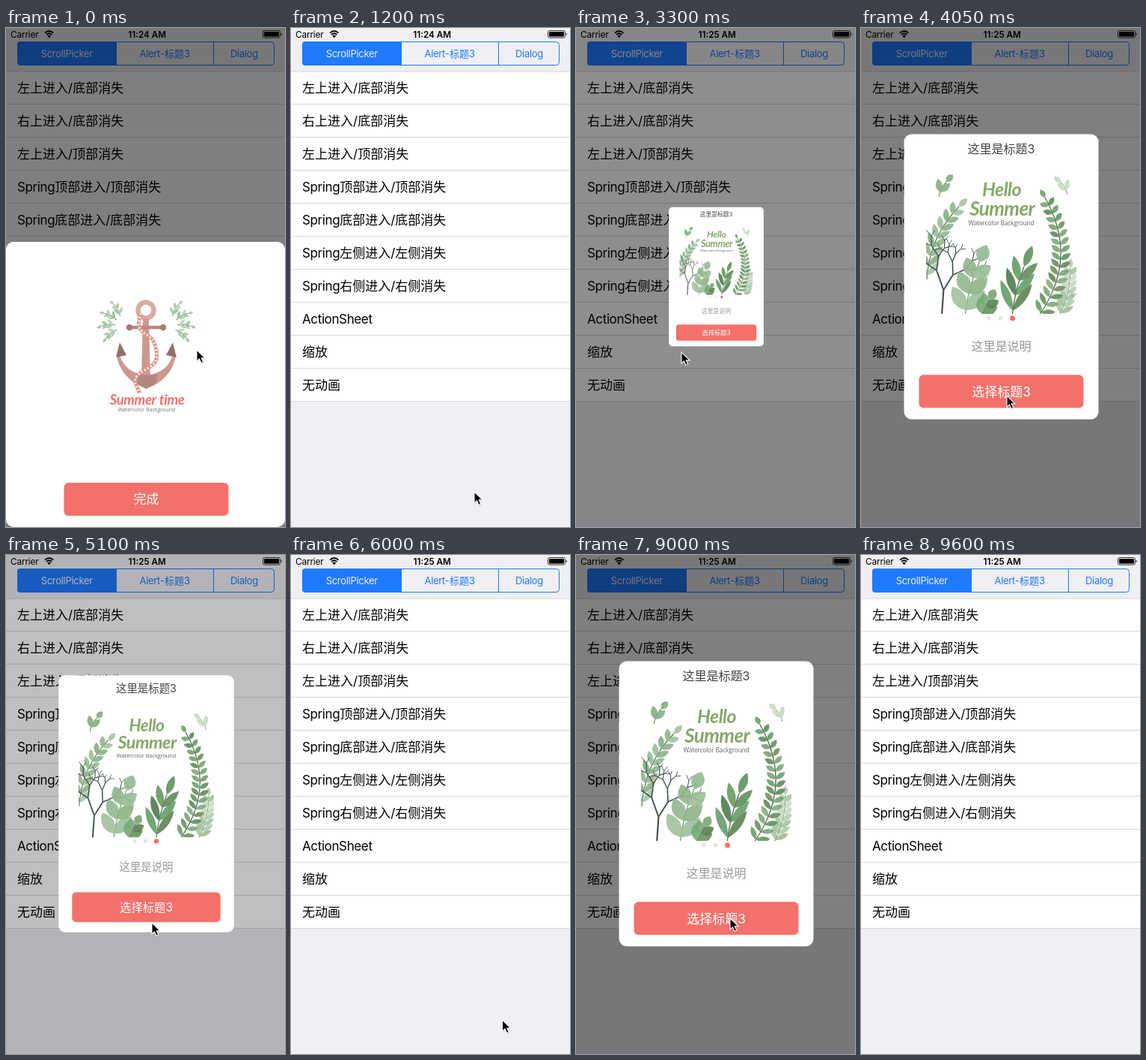
An HTML page for the animation above (9910 ms loop, 373x665 px).

```html
<!DOCTYPE html>
<html lang="zh">
<head>
<meta charset="utf-8">
<style>
html, body { margin: 0; height: 100%; overflow: hidden; background: #efeff4; }
svg { display: block; width: 100vw; height: 100vh; }
text { font-family: Inter, "Noto Sans CJK SC", "Noto Sans CJK", sans-serif; white-space: pre; }
.mid { text-anchor: middle; }
.script { font-family: Lato, sans-serif; font-weight: 700; font-style: italic; }
.caption { font-family: "Open Sans", sans-serif; }
</style>
</head>
<body>
<svg id="stage" viewBox="0 0 373 665"></svg>
<script>
const BLUE = '#1f7aff', CORAL = '#f4716b', LINE = '#d0d0d5';
const LOOP = 9910, STEP = 150, CENTER = 187.5;

// ---- drawing helpers ----
const rect = (x, y, w, h, fill, rx = 0, extra = '') =>
  `<rect x="${x}" y="${y}" width="${w}" height="${h}" fill="${fill}" rx="${rx}" ${extra}/>`;
const circle = (x, y, r, fill) => `<circle cx="${x}" cy="${y}" r="${r}" fill="${fill}"/>`;
const stroke = (d, color, width, extra = '') =>
  `<path d="${d}" fill="none" stroke="${color}" stroke-width="${width}" ${extra}/>`;
const shape = (d, fill, extra = '') => `<path d="${d}" fill="${fill}" ${extra}/>`;
const text = (s, x, y, size, fill, style = 'mid') =>
  `<text x="${x}" y="${y}" font-size="${size}" fill="${fill}" class="${style}">` +
  s.replace(/[A-Za-z]{3,}/g, w => `<tspan letter-spacing="${-size * .022}">${w}</tspan>`) + '</text>';

let seed = 7;
const random = () => (seed = seed * 16807 % 2147483647) / 2147483647;
const green = light => `hsl(${100 + random() * 25} 22% ${light - 8 + random() * 16}%)`;

const leaf = (x, y, angle, len, wide, light) =>
  shape(`M0 0Q${len * .5} ${-wide} ${len} 0Q${len * .5} ${wide} 0 0Z`, green(light),
    `opacity=".9" transform="translate(${x} ${y}) rotate(${angle * 180 / Math.PI})"`);

// Leaf pairs along a stem that bulges sideways by bend
function frond(x0, y0, x1, y1, bend, pairs, len, wide, light, spread = .65) {
  const dx = x1 - x0, dy = y1 - y0, size = Math.hypot(dx, dy);
  const cx = (x0 + x1) / 2 - dy / size * bend, cy = (y0 + y1) / 2 + dx / size * bend;
  let out = stroke(`M${x0} ${y0}Q${cx} ${cy} ${x1} ${y1}`, green(light - 18), 1.2);
  for (let i = 0; i <= pairs; i++) {
    const u = (i + .4) / (pairs + .4), v = 1 - u;
    const x = v * v * x0 + 2 * u * v * cx + u * u * x1;
    const y = v * v * y0 + 2 * u * v * cy + u * u * y1;
    const angle = Math.atan2(v * (cy - y0) + u * (y1 - cy), v * (cx - x0) + u * (x1 - cx));
    for (const side of i < pairs ? [-1, 1] : [0])
      out += leaf(x, y, angle + side * spread, len * (1 - .35 * u), wide, light);
  }
  return out;
}

function twig(x, y, angle, len, depth) {
  const x1 = x + len * Math.cos(angle), y1 = y + len * Math.sin(angle);
  let out = stroke(`M${x} ${y}L${x1} ${y1}`, '#425250', .9 + depth * .25);
  if (depth) for (const side of [-1, 1])
    out += twig(x1, y1, angle + side * (.4 + random() * .3), len * (.65 + random() * .2), depth - 1);
  return out;
}

// ---- scenes ----
function page() {
  const rows = ['左上进入/底部消失', '右上进入/底部消失', '左上进入/顶部消失',
    'Spring顶部进入/顶部消失', 'Spring底部进入/底部消失', 'Spring左侧进入/左侧消失',
    'Spring右侧进入/右侧消失', 'ActionSheet', '缩放', '无动画'];
  return rect(0, 0, 373, 665, '#efeff4') + rect(0, 58, 373, 439.5, '#fff') +
    rect(0, 57.7, 373, .8, LINE) +
    rows.map((row, i) => text(row, 15, 86 + 44 * i, 17, '#000', '') +
      rect(0, 101.2 + 44 * i, 373, .8, LINE)).join('') +
    rect(15.5, 18.5, 343, 31, 'none', 4, `stroke="${BLUE}"`) +
    shape('M148 18H19a4 4 0 0 0-4 4V46a4 4 0 0 0 4 4H148Z', BLUE) +
    rect(277, 18, 1, 32, BLUE) +
    text('ScrollPicker', 81.3, 38.7, 13, '#efeff4') +
    text('Alert-标题3', 212.3, 38.7, 13, BLUE) +
    text('Dialog', 318.5, 38.7, 13, BLUE) +
    statusBar();
}

function statusBar() {
  return text('Carrier', 6, 12.7, 12, '#000', '') +
    stroke('M52 6.6Q57.7 1.6 63.4 6.6M54 8.9Q57.7 5.7 61.4 8.9', '#000', 1.9) +
    shape('M57.7 13.2L55.3 10.6Q57.7 8.6 60.1 10.6Z', '#000') +
    '<text id="clock" class="mid" x="188.7" y="12.6" font-size="11.7" font-weight="600"></text>' +
    rect(343.5, 3.5, 23, 9.5, 'none', 2.2, 'stroke="#000" stroke-width=".8"') +
    rect(345, 5, 20, 6.5, '#000', 1) + shape('M367.8 6.3q2 1.9 0 3.9Z', '#000');
}

const button = (label, y) =>
  rect(77.5, y, 220, 44, CORAL, 6) + text(label, CENTER, y + 28.2, 17, '#fff');

function anchor() {
  const body = '#cd998f', dark = '#94706d';
  const rope = 'M181 380C172 398 180 404 190 410S207 440 196 449S170 461 173 474T179 487';
  let sprigs = '';
  for (let i = 0; i < 4; i++) {
    const c = Math.cos(2.05 + .58 * i), s = -Math.sin(2.05 + .58 * i);
    sprigs += frond(158 + 12 * c, 395 + 12 * s, 158 + 30 * c, 395 + 30 * s, 3, 2, 11, 4, 72, .6);
  }
  const half = shape('M188 463Q158 460 151 433L148 436Q153 468 188 481Z', body) +
    shape('M188 463L173 461L174 474L188 481Z', dark, 'opacity=".45"') +
    shape('M152 419L161 436L147 439Z', dark) +
    stroke('M165 399H188', '#b98780', 4.5) + circle(165, 399, 4.2, '#a97a75') + sprigs;
  return stroke('M176.5 376a10.5 10.5 0 1 1 0 .1Z', '#d9aca2', 6.5) +
    shape('M183 387h8l2 80h-12Z', body) +
    half + `<g transform="matrix(-1 0 0 1 ${2 * CENTER} 0)">${half}</g>` +
    stroke(rope, '#d58f86', 4.8) + stroke(rope, '#f8e2dc', 3.4, 'stroke-dasharray="2.6 2.2"') +
    text('Summer time', 188.5, 501.5, 18.6, CORAL, 'mid script') +
    text('Watercolor Background', 187.8, 511, 7.3, '#777', 'mid caption');
}

function plants() {
  return `<clipPath id="art">${rect(87, 181, 201, 200, '#000')}</clipPath><g clip-path="url(#art)">` +
    frond(88, 335, 131, 238, -20, 8, 24, 8, 64) +
    frond(104, 225, 114, 205, -3, 1, 20, 9, 65, .5) +
    frond(276, 222, 267, 206, 3, 1, 18, 7, 75, .5) +
    frond(265, 383, 280, 320, 8, 7, 20, 7, 74) +
    twig(108, 383, -1.5, 34, 5) +
    frond(139, 385, 158, 312, -6, 3, 38, 18, 63) +
    frond(160, 385, 172, 362, 0, 2, 24, 12, 48) +
    frond(202, 385, 218, 318, -5, 3, 46, 11, 46, .5) +
    frond(238, 383, 246, 226, 50, 15, 19, 7, 52, .95) + '</g>' +
    text('Hello', 188, 224, 25, '#86a868', 'mid script') +
    text('Summer', 188.7, 250, 26, '#86a868', 'mid script') +
    text('Watercolor Background', CENTER, 263, 8.4, '#666', 'mid caption');
}

const sheet = rect(0, 285, 373, 380, '#fff', 10) + anchor() + button('完成', 606);
const dialog = rect(57.5, 141.5, 260, 380, '#fff', 10) + plants() +
  text('这里是标题3', CENTER, 167, 16, '#444') +
  [0, 1, 2].map(i => circle(170.5 + 16 * i, 386.8, i < 2 ? 3 : 3.5, i < 2 ? '#e6e6e6' : CORAL)).join('') +
  text('这里是说明', CENTER, 430.3, 16, '#999') + button('选择标题3', 462.3);
const arrow = 'M0 0V15.2L3.5 11.9L6 17.5L8.7 16.3L6.3 10.9H11Z';

document.getElementById('stage').innerHTML = page() +
  rect(0, 0, 373, 665, '#000', 0, 'id="dim"') +
  `<g id="sheet">${sheet}</g><g id="dialog">${dialog}</g><g id="cursor">` +
  shape(arrow, '#000', 'opacity=".2" transform="translate(.6 1.4)"') +
  shape(arrow, '#000', 'stroke="#fff" stroke-width="1.1"') + '</g>';

// ---- motion ----
const ramp = (t, from, to) => Math.min(1, Math.max(0, (t - from) / (to - from)));
const smooth = u => u * u * (3 - 2 * u);

// Mouse moves: start, end, destination
const moves = [
  [0, 750, 245, 618], [1200, 2250, 141, 432], [3450, 4050, 195, 490], [5550, 6300, 330, 690],
  [6601, 6750, 180, 464], [6750, 7050, 162, 481], [7650, 8550, 206, 484], [9150, 9600, 240, 690]
];
const cursorAt = t => moves.reduce(([x, y], [from, to, x1, y1]) => {
  const u = smooth(ramp(t, from, to));
  return [x + (x1 - x) * u, y + (y1 - y) * u];
}, [255, 429]);

const put = (id, name, value) => document.getElementById(id).setAttribute(name, value);

function draw() {
  // The picture advances in steps of 150 ms
  const t = Math.min(9600, Math.floor(performance.now() % LOOP / STEP) * STEP);
  const slide = ramp(t, 750, 1200);
  const grow = ramp(t, 3150, 3600), shrink = ramp(t, 4950, 5250);
  const appear = ramp(t, 7200, 7500), vanish = ramp(t, 9000, 9300);
  const zooming = t < 6000;
  const scale = zooming ? (1 - (1 - grow) ** 1.65) * (1 - shrink ** 3.35) : 1;
  const shade = (1 - slide) + ramp(t, 3150, 3320) * (1 - shrink) + appear ** 4 * (1 - vanish);

  document.getElementById('clock').textContent = t < 2400 ? '11:24 AM' : '11:25 AM';
  put('dim', 'opacity', .5 * shade);
  put('sheet', 'transform', `translate(0 ${385 * slide})`);
  put('dialog', 'transform',
    `translate(${CENTER} 331.5) scale(${scale}) translate(${-CENTER} -331.5)`);
  put('dialog', 'opacity', zooming ? 1 : appear ** 2 * (1 - vanish));
  put('cursor', 'transform', `translate(${cursorAt(t)})`);
  requestAnimationFrame(draw);
}
draw();
</script>
</body>
</html>
```
